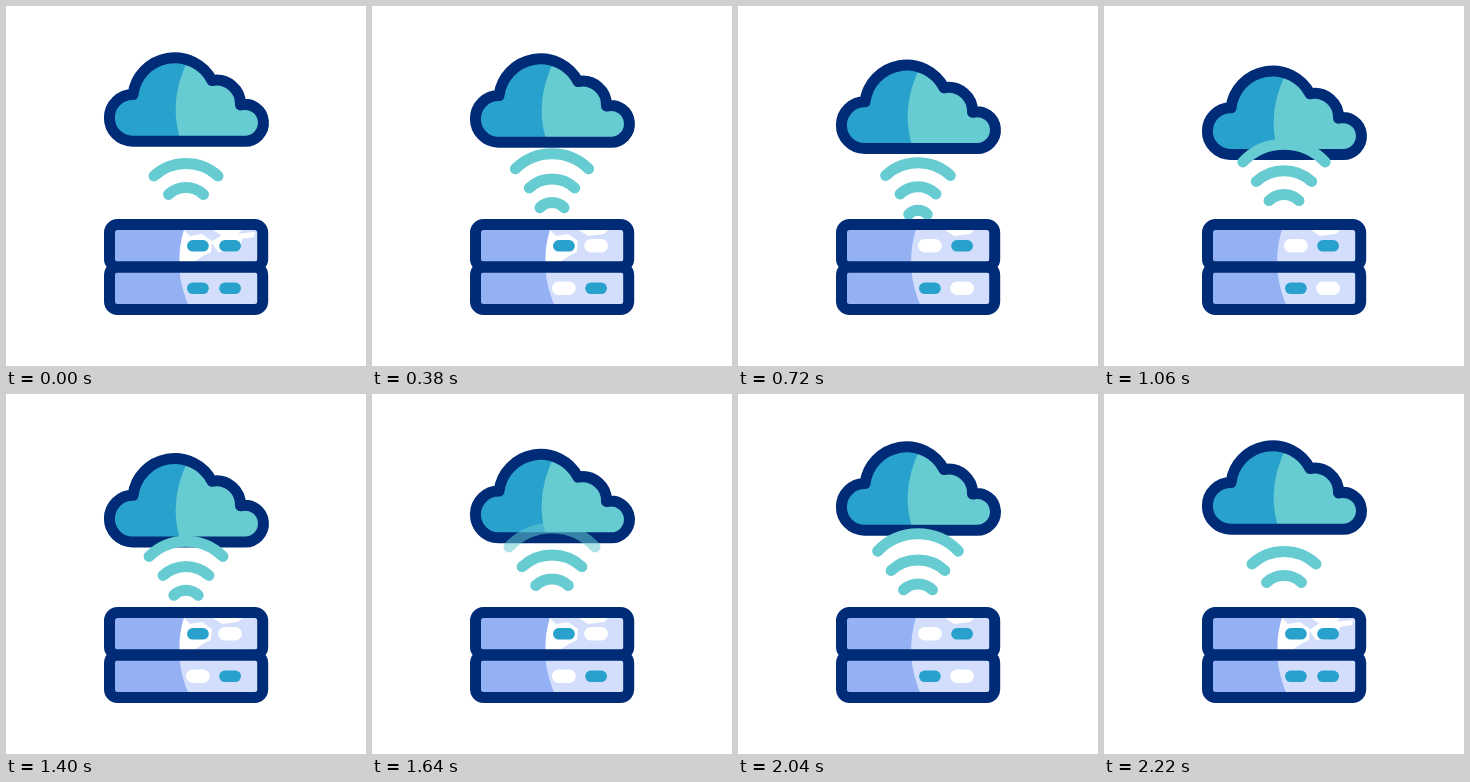
These frames come from a looping animation (360x360 px, 2.4 s). An HTML page:

```html
<!DOCTYPE html>
<html lang="en">
<head>
<meta charset="utf-8">
<title>Cloud server</title>
<style>
  html, body { margin: 0; width: 100%; height: 100%; overflow: hidden; background: #fff; }
  svg { display: block; width: 100vw; height: 100vh; }
  .outline { fill: none; stroke: #002c77; stroke-width: 11; stroke-linejoin: round; }
  .wave { fill: none; stroke: #67ccd2; stroke-width: 11; stroke-linecap: round; }
  .on { fill: #28a1cd; }
  .off { fill: #fff; stroke: #fff; stroke-width: 2; }
</style>
</head>
<body>
<svg viewBox="0 0 360 360">
  <defs>
    <path id="cloudShape" d="M126.5 135.2A23.3 23.3 0 0 1 127 88.5A42 42 0 0 1 206 74.5A24 24 0 0 1 234.5 99A18.4 18.4 0 1 1 238 135.2Z"/>
    <clipPath id="cloudClip"><use href="#cloudShape"/></clipPath>
  </defs>
  <g id="cloud">
    <g clip-path="url(#cloudClip)">
      <path fill="#28a1cd" d="M95 45H265V140H95Z"/>
      <path fill="#67ccd2" d="M184 50Q160 95 176 138H265V50Z"/>
    </g>
    <use href="#cloudShape" class="outline"/>
  </g>
  <g id="waves"></g>
  <g id="server">
    <path fill="#94b1f4" d="M104 219H257V303H104Z"/>
    <path fill="#d3ddfc" d="M179 220Q165 262 184 303H257V219Z"/>
    <path fill="#fff" d="M207 224H236L232 228L216 230Z"/>
    <path id="shine" fill="#fff" d="M178 224L184 230L196 228L206 235L205 246L197 250L188 256H174Q173 240 178 224Z"/>
    <path id="glare" fill="#fff" d="M205 236L216 229L249 226L248 231L236 233L233 245L212 246Z"/>
    <g id="lights"></g>
    <rect class="outline" x="103.5" y="218.5" width="153.2" height="42.5" rx="8"/>
    <rect class="outline" x="103.5" y="261" width="153.2" height="42.5" rx="8"/>
  </g>
</svg>
<script>
const LOOP = 2400, START = 200, END = 2220, STEP = 20;
const BEATS = 4, BEAT = (END - START) / BEATS, DROP = 14;
const byId = id => document.getElementById(id);

function add(parent, tag, attrs) {
  const node = document.createElementNS("http://www.w3.org/2000/svg", tag);
  for (const key in attrs) node.setAttribute(key, attrs[key]);
  return parent.appendChild(node);
}

const waves = [0, 1, 2].map(() => add(byId("waves"), "path", { class: "wave" }));
const lights = [[181, 234], [213.2, 234], [181, 276.5], [213.2, 276.5]].map(([x, y]) =>
  add(byId("lights"), "rect", { x, y, width: 21.8, height: 11.6, rx: 5.8 }));

// Wave geometry at ages 0..3, in beats
const HALF = [9, 17.5, 32, 45], FOOT = [209, 188.5, 170, 150], APEX = [205, 181.5, 157.5, 130];

function along(stops, age) {
  const i = Math.min(Math.floor(age), stops.length - 2);
  return stops[i] + (stops[i + 1] - stops[i]) * (age - i);
}

function wavePath(age) {
  const half = along(HALF, age), foot = along(FOOT, age), rise = foot - along(APEX, age);
  const r = (half * half + rise * rise) / (2 * rise);
  return `M${180 - half} ${foot}A${r} ${r} 0 0 1 ${180 + half} ${foot}`;
}

function render(time) {
  const t = Math.floor((time % LOOP) / STEP) * STEP;
  const resting = t < START || t >= END;
  const beats = resting ? 0 : (t - START) / BEAT;
  const beat = Math.floor(beats), phase = beats - beat;

  const dy = DROP * (1 - Math.cos(2 * Math.PI * beats / BEATS)) / 2;
  byId("cloud").setAttribute("transform", `translate(0 ${dy})`);

  waves.forEach((wave, i) => {
    wave.setAttribute("d", wavePath(i + phase));
    const fade = i === 2 ? Math.min(1, (1 - phase) / 0.28) : 1;
    wave.setAttribute("opacity", resting && i === 0 ? 0 : fade);
  });

  const firstPair = beat % 2 === 0;
  lights.forEach((light, i) => {
    const diagonal = i === 0 || i === 3;
    light.setAttribute("class", resting || diagonal === firstPair ? "on" : "off");
  });
  byId("shine").setAttribute("opacity", firstPair ? 1 : 0);
  byId("glare").setAttribute("opacity", resting ? 1 : 0);
}

const origin = performance.now();
function tick() {
  render(performance.now() - origin);
  requestAnimationFrame(tick);
}
tick();
</script>
</body>
</html>
```
